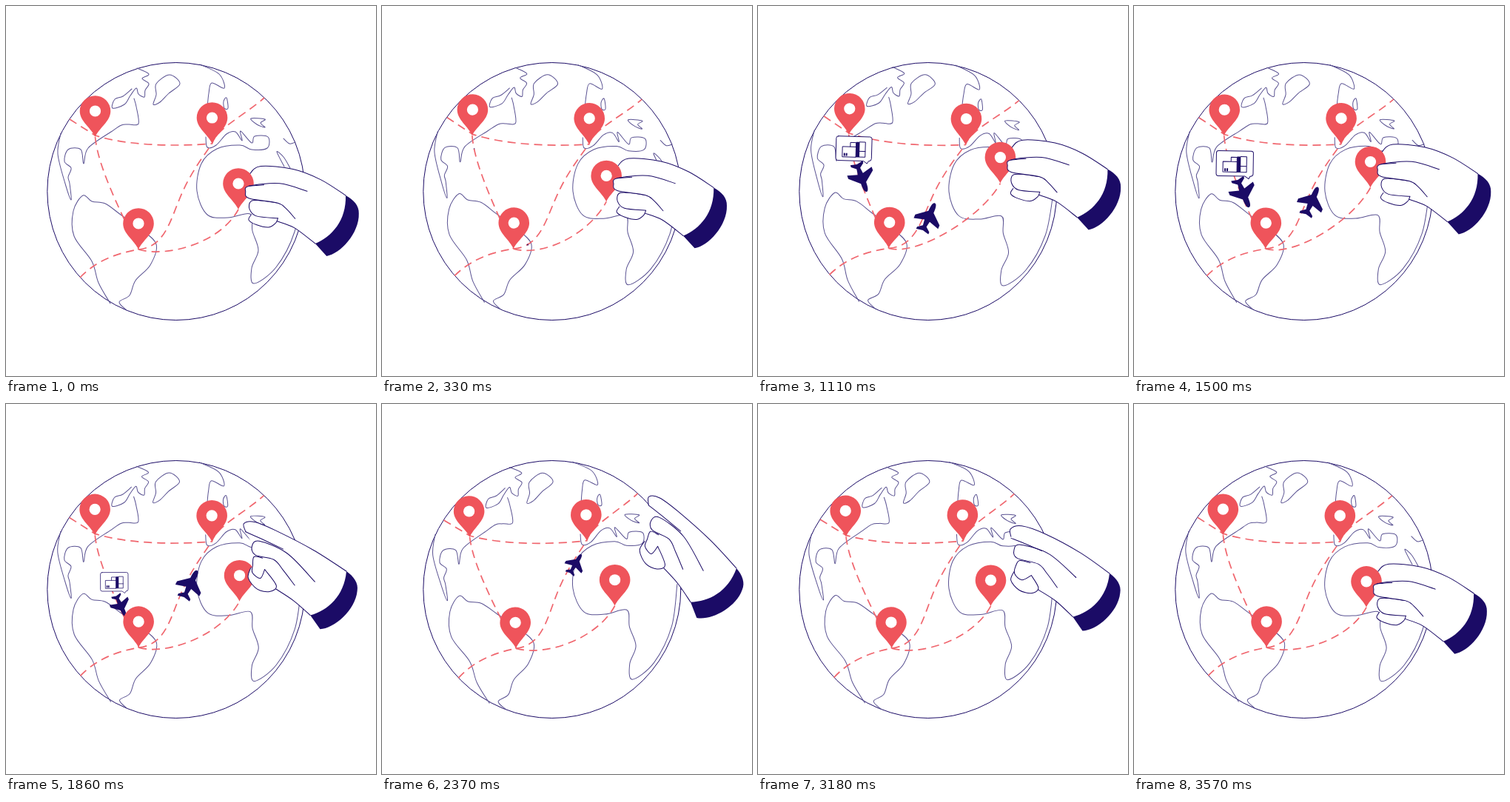
These frames come from a looping animation (500 px wide and 500 px high, 3.6 s). An HTML page:

```html
<!DOCTYPE html>
<html lang="en">
<head>
<meta charset="utf-8">
<title>Shipping routes</title>
<style>
html, body { margin: 0; width: 100%; height: 100%; overflow: hidden; background: #fff; }
svg { display: block; width: 100vw; height: 100vh; }
.line { fill: none; stroke: #1b0b66; stroke-linecap: round; stroke-linejoin: round; }
#land { stroke: #5a5292; }
.skin { fill: #fff; }
.navy { fill: #1b0b66; }
.route { fill: none; stroke: #f0666e; stroke-width: 1.7; stroke-dasharray: 11 7; }
.pin { fill: #ef545b; }
</style>
</head>
<body>
<svg viewBox="0 0 500 500">
  <defs>
    <g id="pin">
      <path class="pin" d="M0 0C-5 -12 -20.8 -21 -20.8 -35A20.8 20.8 0 1 1 20.8 -35C20.8 -21 5 -12 0 0Z"/>
      <circle cy="-35" r="7.6" fill="#fff"/>
    </g>
    <path id="plane" class="navy" d="M0 -21C3 -21 3.8 -15 3.8 -8L18 4V9L3.8 5L2.6 13L9 18V21L0 19L-9 21V18L-2.6 13L-3.8 5L-18 9V4L-3.8 -8C-3.8 -15 -3 -21 0 -21Z"/>
  </defs>
  <circle class="line" cx="229.8" cy="250.5" r="174"/>
  <g id="globe">
    <path id="land" class="line"/>
    <path class="route" d="M86 153L120.5 175C165 189 230 190 278.5 186C285 165 322 148 349 124"/>
    <path class="route" d="M100 367C122 344 150 334 179 329"/>
    <path class="route" id="west" d="M120.5 177C124 215 150 268 179 329"/>
    <path class="route" id="east" d="M179 329C214 326 222 290 234 262C246 232 260 212 278.5 186"/>
    <use id="planeA" href="#plane"/>
    <use id="planeB" href="#plane"/>
    <g id="parcel">
      <path class="line skin" d="M-22 -17.5H22Q25 -17.5 25 -14.5V13Q25 16.5 21 16.5L19 20L14 16.5H-22Q-25 16.5 -25 13V-14.5Q-25 -17.5 -22 -17.5Z"/>
      <path class="line" d="M-16 11V-3H-5V-9H3V11ZM-5 -3H3M8 -10H16V11H3M8 3H16"/>
      <path class="navy" d="M3 -10H8V11H3ZM-14 6H-12V10H-14ZM-11 6H-9V10H-11Z"/>
    </g>
  </g>
  <path class="route" id="south"/>
  <g id="pins">
    <use href="#pin" x="120.5" y="177"/>
    <use href="#pin" x="278.5" y="186"/>
    <use href="#pin" x="179" y="329"/>
  </g>
  <g id="back">
    <path id="palm" class="skin"/>
    <path id="top" class="line"/>
    <path id="heel" class="line"/>
  </g>
  <use id="held" href="#pin"/>
  <g id="front">
    <path id="ring" class="line skin"/>
    <path id="middle" class="line skin"/>
    <path id="thumb" class="line skin"/>
    <path id="fold" class="line"/>
    <path class="navy" d="M0 0C12 -1 23 2 28 11C43 33 36 71 22 83L0 77C14 57 19 28 0 0Z"/>
  </g>
</svg>
<script>
const LOOP = 3600, CX = 229.8, CY = 250.5;
const $ = id => document.getElementById(id);

// Coastlines as key points; "z" closes one
const coasts = [
  '199,133 203,120 203,105 221,93 235,105 220,118 208,130 z',
  '177,84 193,92 184,98 193,105 188,114 187,123 179,119 176,111 168,121 160,133 144,138 147,126 158,122 170,112',
  '74,172 70,200 80,240 88,262 86,240 84,231 88,219 79,210 84,194 101,194 105,213 111,192 142,170 156,161 166,160 179,159 176,136 173,125',
  '141,402 125,374 116,345 92,311 91,277 104,256 116,264 134,267 155,282 180,300 203,322 195,350 175,371 167,391 153,400 163,411',
  '262,79 288,92 295,111 278,104 274,118 272,138',
  '298,124 300,138 295,138 294,129 z',
  '270,177 272,191 284,188 298,173 310,170 319,182 317,169 332,185 336,176 354,177 353,192 332,194 316,188 285,193 264,213 258,250 272,282 300,286 330,281 333,304 341,330 332,354 335,375 365,353 390,305 399,248',
  '331,152 350,153 344,158 350,164 339,160 z',
  '384,219 375,204 366,197 376,217',
  '375,179 383,186 391,184'
];

// Hand parts, pinched and open, measured from the top of the cuff
const parts = {
  top: ['0,0 -40,0 -79,8 -118,28 -125,45 -122,54', '0,0 -52,6 -109,18 -138,27 -148,38 -139,45'],
  heel: ['-60,79 -35,74 0,77', '-59,79 -30,76 0,77'],
  ring: ['-94,90 -93,98 -81,98 -65,92 -60,82 -61,75', '-103,78 -97,91 -78,95 -63,87 -61,75 -87,68'],
  middle: ['-73,58 -93,67 -104,75 -100,85 -87,88 -61,75', '-99,58 -109,64 -103,74 -97,82 -84,81 -87,68'],
  thumb: ['-47,23 -84,34 -117,59 -117,68 -108,73 -73,58 -59,58 -41,63', '-24,38 -77,32 -117,43 -120,55 -109,61 -86,50 -67,53 -42,59'],
  fold: ['-117,59 -109,53 -101,47', '-139,45 -117,39 -85,31']
};

// Time, cuff x, cuff y, turn, openness
const moves = [
  [0, 459, 256, 32.3, 0],
  [690, 436, 233.5, 32.3, 0],
  [1170, 474, 220, 32.3, 0],
  [1500, 464.5, 226.5, 32.3, 0],
  [1860, 460, 226, 39.3, 1],
  [2370, 479, 222, 53.6, 1],
  [2820, 482, 217, 43.4, 1],
  [2940, 482, 217, 43.4, 1],
  [3600, 459, 256, 32.3, 0]
];

const clamp = x => Math.min(1, Math.max(0, x));
const ease = (t, a, b) => { const x = clamp((t - a) / (b - a)); return x * x * (3 - 2 * x); };
const mix = (a, b, e) => a + (b - a) * e;
const points = s => s.replace(' z', '').split(' ').map(p => p.split(',').map(Number));

// Smooth path through points
function spline(pts, closed) {
  const n = pts.length, at = i => pts[closed ? (i + n) % n : Math.min(n - 1, Math.max(0, i))];
  let d = 'M' + pts[0];
  for (let i = 0; i < (closed ? n : n - 1); i++) {
    const [p, a, b, q] = [at(i - 1), at(i), at(i + 1), at(i + 2)];
    const c1 = a.map((v, k) => v + (b[k] - p[k]) / 6), c2 = b.map((v, k) => v - (q[k] - a[k]) / 6);
    d += `C${c1} ${c2} ${b}`;
  }
  return d;
}

function hand(t) {
  const i = Math.max(0, moves.findIndex(m => m[0] > t) - 1), a = moves[i], b = moves[i + 1];
  return a.slice(1).map((v, k) => mix(v, b[k + 1], ease(t, a[0], b[0])));
}

function turn(x, y, a) {
  const c = Math.cos(a), s = Math.sin(a);
  return [CX + (x - CX) * c - (y - CY) * s, CY + (x - CX) * s + (y - CY) * c];
}

function along(path, f) {
  const len = path.getTotalLength(), at = d => path.getPointAtLength(clamp(d / len) * len);
  const p = at(f * len), a = at(f * len - 2), b = at(f * len + 2);
  return [p.x, p.y, Math.atan2(b.y - a.y, b.x - a.x) * 180 / Math.PI + 90];
}

function put(id, x, y, angle, s) {
  $(id).setAttribute('transform', `translate(${x} ${y}) rotate(${angle}) scale(${s})`);
  $(id).style.display = s > 0.01 ? '' : 'none';
}

function drawPlanes(t) {
  const f = clamp(t / 3000), out = 1 - ease(t, 1500, 2600);
  const sA = ease(t, 200, 1200) * out, sP = ease(t, 400, 1200) * out;
  const sB = ease(t, 200, 1000) * (1 - ease(t, 2050, 3000));
  const [ax, ay, aa] = along($('west'), f);
  const [bx, by, ba] = along($('east'), f);
  put('planeA', ax + 3 * sA, ay - sA, aa, sA);
  put('planeB', bx + 7 * sB, by, ba, sB);
  put('parcel', ax + 2 - 11 * sP, ay - 10 - 30 * sP, 0, sP);
}

function drawHand(t) {
  const [x, y, angle, open] = hand(t), d = {};
  for (const k in parts) {
    const [a, b] = parts[k];
    d[k] = spline(a.map((p, i) => p.map((v, j) => mix(v, b[i][j], open))));
    $(k).setAttribute('d', d[k]);
  }
  $('palm').setAttribute('d', d.top + d.heel.replace('M', 'L'));
  put('back', x, y, angle, 1);
  put('front', x, y, angle, 1);
}

function drawHeld(t, tilt) {
  const landed = ease(t, 1500, 2050), grip = hand(Math.min(t, 1500));
  const [x, y] = turn(314, 275, tilt * landed).map((v, k) => v + (grip[k] - moves[0][k + 1]) * (1 - landed));
  const [sx, sy] = turn(179, 329, tilt);
  put('held', x, y, 0, 1);
  $('south').setAttribute('d', `M${sx} ${sy}C${sx + 38} ${sy + 11} ${x - 25} ${y + 46} ${x} ${y}`);
}

function draw(t) {
  const tilt = 0.032 * Math.sin(2 * Math.PI * t / LOOP);
  for (const id of ['globe', 'pins']) {
    $(id).setAttribute('transform', `rotate(${tilt * 180 / Math.PI} ${CX} ${CY})`);
  }
  drawPlanes(t);
  drawHand(t);
  drawHeld(t, tilt);
}

$('land').setAttribute('d', coasts.map(s => spline(points(s), s.endsWith('z'))).join(''));
for (const k in parts) parts[k] = parts[k].map(points);

const start = performance.now();
function tick() {
  draw((performance.now() - start) % LOOP);
  requestAnimationFrame(tick);
}
tick();
</script>
</body>
</html>
```
